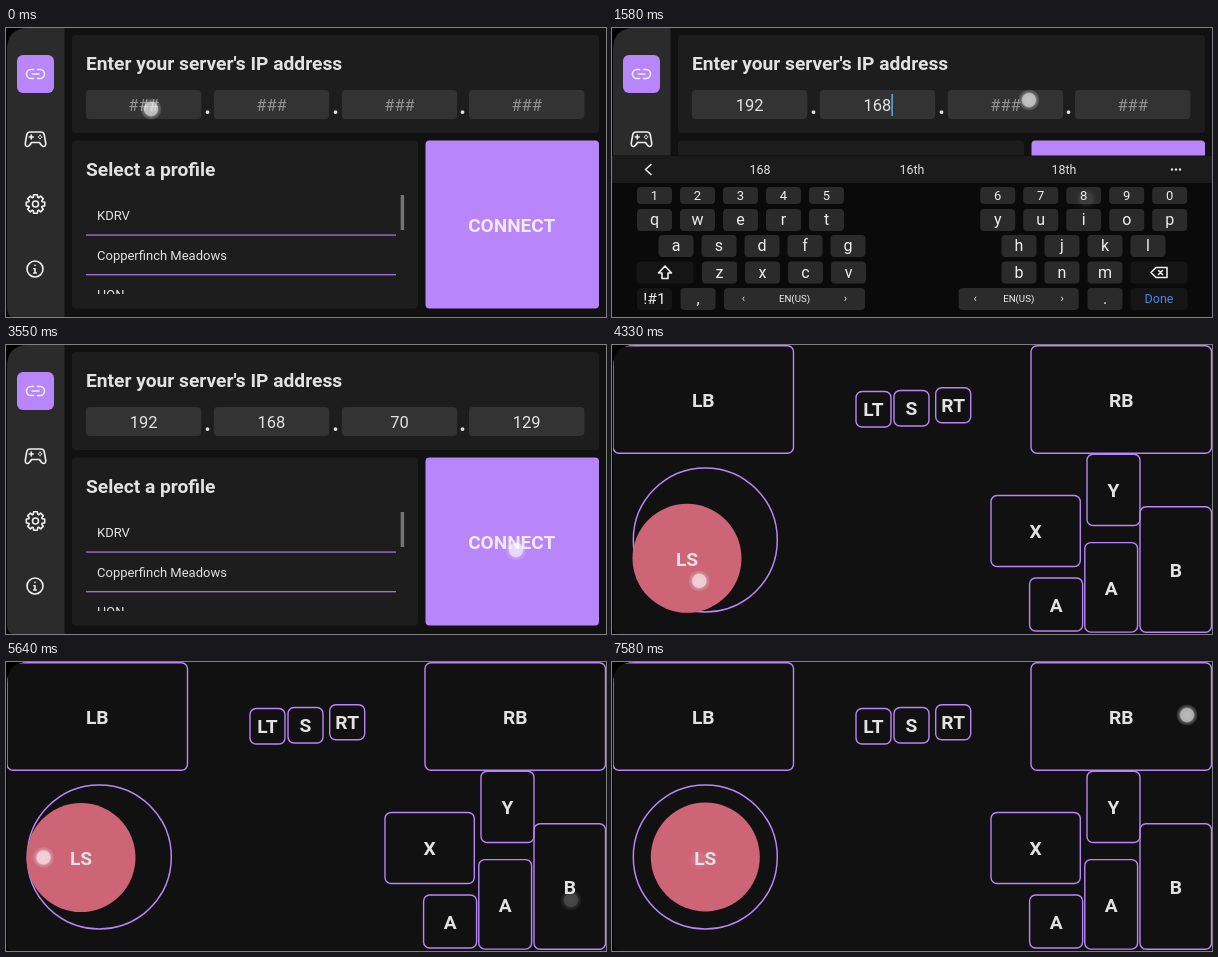
An HTML page that plays this animation: 600 by 289 pixels, repeating every 7.61 s.

```html
<!DOCTYPE html>
<html lang="en">
<head>
<meta charset="utf-8">
<title>Touch controller setup</title>
<style>
html, body { margin: 0; width: 100%; height: 100%; overflow: hidden; background: #000; }
svg { display: block; width: 100vw; height: 100vh; font-family: Roboto, sans-serif; }
text { fill: #e2e2e2; white-space: pre; }
.mid { text-anchor: middle; }
.bold { font-weight: 700; font-size: 19.2px; }
.line { fill: none; stroke: #eee; stroke-width: 1.6; stroke-linecap: round; stroke-linejoin: round; }
</style>
</head>
<body>
<svg id="stage" viewBox="0 0 600 289">
  <defs>
    <radialGradient id="glow">
      <stop offset="0" stop-color="#fff" stop-opacity=".72"/>
      <stop offset=".62" stop-color="#fff" stop-opacity=".66"/>
      <stop offset=".76" stop-color="#ddd" stop-opacity=".3"/>
      <stop offset="1" stop-color="#ccc" stop-opacity=".12"/>
    </radialGradient>
    <clipPath id="screen"><path d="M1 289V22Q1 0 23 0H600V289H8Q1 289 1 280Z"/></clipPath>
    <clipPath id="list"><rect x="80" y="165" width="312" height="101"/></clipPath>
  </defs>
  <g clip-path="url(#screen)">
    <rect width="600" height="289" fill="#111"/>
    <g id="setup"></g>
    <g id="pad"></g>
  </g>
  <g id="keyboard"></g>
  <g id="touches"></g>
</svg>
<script>
const LOOP = 7610, CONNECTED = 3690;
const PURPLE = '#b985fa';
const $ = id => document.getElementById(id);
const clamp = (v, a, b) => Math.min(b, Math.max(a, v));
const ease = p => p * p * (3 - 2 * p);
const phase = (t, a, b) => ease(clamp((t - a) / (b - a), 0, 1));

function add(parent, tag, attrs, content) {
  const el = document.createElementNS('http://www.w3.org/2000/svg', tag);
  for (const key in attrs) el.setAttribute(key, attrs[key]);
  if (content !== undefined) el.textContent = content;
  parent.appendChild(el);
  return el;
}
const box = (parent, x, y, w, h, fill, rx = 4) =>
  add(parent, 'rect', { x, y, width: w, height: h, fill, rx });
const label = (parent, x, y, content, size, cls = 'mid', fill = '#e2e2e2') =>
  add(parent, 'text', { x, y, class: cls, style: `font-size:${size}px;fill:${fill}` }, content);
const line = (parent, d, attrs) => add(parent, 'path', { d, class: 'line', ...attrs });

// Setup page
const setup = $('setup');
box(setup, 0, 0, 58.5, 289, '#2b2b2b', 0);
box(setup, 11, 27, 37, 38, PURPLE, 6);
const icon = y => add(setup, 'g', { transform: `translate(29.5 ${y})` });
line(icon(46), 'M-2-4.5H-4.5A4.5 4.5 0 0 0-4.5 4.5H-2M2-4.5H4.5A4.5 4.5 0 0 1 4.5 4.5H2M-3.5 0H3.5');

const gamepad = icon(111);
line(gamepad, 'M-5.5-7H5.5Q8-7 8.7-4.5L10.2 4Q10.5 7.5 8 7.5Q6.5 7.5 4 3.5H-4Q-6.5 7.5-8 7.5Q-10.5 7.5-10.2 4L-8.7-4.5Q-8-7-5.5-7Z');
line(gamepad, 'M-6.2-2H-2.2M-4.2-4V0M3-2H3.1M6-2H6.1M4.5-3.6H4.6M4.5-.4H4.6', { 'stroke-width': 1.3 });

const gear = icon(176);
let teeth = '';
for (let i = 0; i < 8; i++) {
  [[-.32, 7], [-.2, 9.4], [.2, 9.4], [.32, 7]].forEach(([turn, r]) => {
    const a = i * Math.PI / 4 + turn;
    teeth += `${teeth ? 'L' : 'M'}${(r * Math.sin(a)).toFixed(2)} ${(-r * Math.cos(a)).toFixed(2)}`;
  });
}
line(gear, teeth + 'Z');
add(gear, 'circle', { r: 3, class: 'line' });

const info = icon(241);
add(info, 'circle', { cx: -.5, r: 8, class: 'line' });
line(info, 'M-.5-.3V4M-.5-3.6V-3.5M-1.6-.3H-.5M-1.8 4H.8', { 'stroke-width': 1.5 });

box(setup, 66, 7, 527, 98, '#1d1d1d');
box(setup, 66, 112.5, 346, 168, '#1d1d1d');
box(setup, 419.5, 112.5, 173.5, 168, PURPLE);
label(setup, 80, 42, "Enter your server's IP address", 19.2, 'bold');
label(setup, 80, 147.5, 'Select a profile', 19.2, 'bold');
label(setup, 505.7, 204, 'CONNECT', 19, 'bold mid', '#f1eaf8');

const list = add(setup, 'g', { 'clip-path': 'url(#list)' });
['KDRV', 'Copperfinch Meadows', 'HQN'].forEach((name, i) => {
  label(list, 91, 192 + i * 39.5, name, 13, '');
  box(list, 80, 206.5 + i * 39.7, 310, 1.1, PURPLE, 0);
});
box(setup, 394.7, 167, 3.4, 35, '#737373', 0);

const FIELD_X = [137.6, 265.5, 393.5, 520.7];
const fields = FIELD_X.map((x, i) => {
  box(setup, x - 57.7, 62, 115.4, 29, '#333');
  if (i) label(setup, x - 64, 86, '.', 23, 'bold mid');
  return label(setup, x, 83, '###', 16.5);
});
const caret = box(setup, 0, 66, 1.4, 22, '#62b8dc', 0);

// Controller page
const pad = $('pad');
box(pad, 0, 0, 600, 289, '#111', 0);
[
  ['LB', 1, .7, 180.5, 107.5], ['RB', 419, .7, 180.5, 107.5],
  ['LT', 244, 46.5, 35, 35.5], ['S', 282, 45.5, 35, 35.5], ['RT', 323.7, 42.7, 35, 35],
  ['Y', 475, 109.3, 53, 71.2], ['X', 379, 150.5, 89.3, 71],
  ['B', 528, 161.7, 71.5, 125.5], ['A', 472.8, 197.6, 52.8, 89.5], ['A', 417.6, 233, 53, 53]
].forEach(([name, x, y, w, h]) => {
  box(pad, x, y, w, h, 'none', 6).setAttribute('stroke', PURPLE);
  pad.lastChild.setAttribute('stroke-width', 1.4);
  label(pad, x + w / 2, y + h / 2 + 7.2, name, 19.2, 'bold mid');
});
const HOME = [93.3, 195];
add(pad, 'circle', { cx: HOME[0], cy: HOME[1], r: 72, fill: 'none', stroke: PURPLE, 'stroke-width': 1.5 });
const stick = add(pad, 'g', {});
add(stick, 'circle', { r: 54.5, fill: '#cd6577' });
label(stick, 0, 7.7, 'LS', 19.2, 'bold mid');

// Keyboard
const keyboard = $('keyboard');
box(keyboard, 0, 127.5, 600, 162, '#0a0a0a', 0);
box(keyboard, 0, 128, 600, 27, '#1b1b1b', 0);
line(keyboard, 'M39 136.5L33.5 141.5L39 146.5', { 'stroke-width': 1.4 });
[560, 564, 568].forEach(cx => add(keyboard, 'circle', { cx, cy: 141.5, r: 1.2, fill: '#ddd' }));
const hints = [148, 300, 452].map(x => label(keyboard, x, 146, '', 12.4));

function key(cx, y, w, h, name, size = 16, fill = '#2b2b2b', ink = '#eee') {
  box(keyboard, cx - w / 2, y, w, h, fill);
  if (name) label(keyboard, cx, y + h / 2 + size * .34, name, size, 'mid', ink);
}
[
  ['12345', 42.5, 159, 17, 13], ['67890', 385.7, 159, 17, 13],
  ['qwert', 42.5, 181, 22, 16], ['yuiop', 385.7, 181, 22, 16],
  ['asdfg', 64, 207, 22, 16], ['hjkl', 407, 207, 22, 16],
  ['zxcv', 107.5, 233.5, 22, 16], ['bnm', 407, 233.5, 22, 16]
].forEach(([names, x, y, h, size]) =>
  [...names].forEach((name, i) => key(x + i * 43, y, 35, h, name, size)));
const DARK = '#151515';
key(53, 233.5, 57, 22, '', 16, DARK);
key(547, 233.5, 57, 22, '', 16, DARK);
line(keyboard, 'M53 238L59.5 245H56V250.5H50V245H46.5Z', { 'stroke-width': 1.3 });
line(keyboard, 'M544 239.5H555V249.5H544L539 244.5ZM546.5 242.5L550.5 246.5M550.5 242.5L546.5 246.5', { 'stroke-width': 1.3 });
key(42.5, 260, 35, 22, '!#1', 15.5, DARK);
key(86, 260, 35, 22, ',');
key(493, 260, 35, 22, '.');
key(547, 260, 57, 22, 'Done', 12.5, DARK, '#3d87f5');
[[182.5, 141, 51], [406.7, 120, 43.5]].forEach(([x, w, arrow]) => {
  key(x, 260, w, 22, 'EN(US)', 9.7);
  label(keyboard, x - arrow, 274, '‹', 11);
  label(keyboard, x + arrow, 274, '›', 11);
});

// Taps: down, up, x, y, action (a digit to type or a field to focus)
const TAPS = [
  [-60, 60, 145, 81, 'field0'], [390, 460, 43, 170, '1'], [540, 610, 518, 171, '9'], [700, 770, 88, 170, '2'],
  [880, 960, 286, 75, 'field1'], [1070, 1140, 43, 170, '1'], [1220, 1290, 388, 170, '6'], [1380, 1450, 474, 171, '8'],
  [1530, 1630, 417, 72, 'field2'], [1750, 1820, 431, 171, '7'], [1900, 1970, 560, 171, '0'],
  [2090, 2170, 545, 76, 'field3'], [2270, 2340, 43, 170, '1'], [2430, 2500, 88, 170, '2'], [2590, 2670, 521, 172, '9'],
  [2850, 2920, 548, 270, 'done'], [3460, 3560, 510, 205],
  [4520, 4620, 563, 235], [4840, 4930, 497, 241], [5160, 5250, 425, 190], [5440, 5540, 565, 238],
  [5880, 5970, 498, 242], [6140, 6230, 425, 188], [6410, 6510, 497, 240],
  [6790, 6900, 572, 40], [7080, 7170, 497, 242], [7440, 7700, 575, 53]
];
const HINTS = [
  [460, '1', '192.168.70.171', '1st'], [770, '192', '192.168.70.171', '1920'], [960, '', '', ''],
  [1140, '1', '192.168.70.171', '1st'], [1450, '168', '16th', '18th'], [1630, '', '', ''],
  [1820, '7', '70', '7th'], [1970, '70', '70s', '70th'], [2170, '', '', ''], [2340, '1', '192.168.70.171', '1st']
];
// Thumb drags on the stick: time, x, y
const DRAGS = [
  [[3960, 93, 195], [4060, 50, 200], [4200, 46, 218], [4270, 60, 226], [4330, 87, 236], [4480, 125, 220],
   [4650, 138, 195], [4850, 60, 188], [4980, 27, 196], [5640, 37.5, 195.5], [5840, 40, 196]],
  [[6440, 93, 199], [6520, 87, 198], [6580, 68, 192], [6700, 42, 194], [7300, 40, 203], [7450, 46, 203]]
];

function along(points, t) {
  const i = clamp(points.findIndex(p => p[0] > t), 1, points.length - 1);
  const [a, b] = [points[i - 1], points[i]];
  const p = clamp((t - a[0]) / (b[0] - a[0]), 0, 1);
  return [a[1] + (b[1] - a[1]) * p, a[2] + (b[2] - a[2]) * p];
}
const span = drag => [drag[0][0], drag[drag.length - 1][0]];

function stickAt(t) {
  const drag = DRAGS.find(d => t >= d[0][0] && t < span(d)[1] + 130);
  if (!drag) return HOME;
  const [start, end] = span(drag);
  const back = 1 - phase(t, end + 10, end + 110);
  const pos = along(drag, clamp(t - 60, start, end));
  return pos.map((v, i) => HOME[i] + clamp(v - HOME[i], -18.3, 18.3) * back);
}

const dots = [...TAPS, ...DRAGS].map(() => add($('touches'), 'circle', { r: 10.5, fill: 'url(#glow)' }));
function showDot(dot, t, down, up, x, y) {
  const alpha = clamp((t - down) / 45, 0, 1) * clamp(1 - (t - up) / 150, 0, 1);
  dot.setAttribute('opacity', alpha);
  dot.setAttribute('cx', x);
  dot.setAttribute('cy', y);
}

function render(t) {
  const values = ['', '', '', ''];
  let focus = -1;
  for (const [, up, , , action] of TAPS) {
    if (!action || up > t) continue;
    if (action === 'done') focus = -1;
    else if (action.startsWith('field')) focus = +action.slice(5);
    else values[focus] += action;
  }
  fields.forEach((field, i) => {
    field.textContent = values[i] || '###';
    field.style.fill = values[i] ? '#e2e2e2' : '#929292';
  });
  caret.setAttribute('visibility', focus < 0 ? 'hidden' : 'inherit');
  if (focus >= 0) caret.setAttribute('x', FIELD_X[focus] + values[focus].length * 4.64);

  const raised = phase(t, 120, 300) * (1 - phase(t, 2920, 3050));
  keyboard.setAttribute('visibility', raised ? 'visible' : 'hidden');
  keyboard.setAttribute('transform', `translate(0 ${162 * (1 - raised)})`);
  const words = HINTS.filter(h => h[0] <= t).pop() || [0, '', '', ''];
  hints.forEach((hint, i) => hint.textContent = words[i + 1]);

  const playing = t >= CONNECTED;
  setup.setAttribute('visibility', playing ? 'hidden' : 'visible');
  pad.setAttribute('visibility', playing ? 'visible' : 'hidden');
  stick.setAttribute('transform', `translate(${stickAt(t).join(' ')})`);

  TAPS.forEach(([down, up, x, y], i) => showDot(dots[i], t, down, up, x, y));
  DRAGS.forEach((drag, i) => showDot(dots[TAPS.length + i], t, ...span(drag), ...along(drag, t)));
}

const begin = performance.now();
function tick() {
  render((performance.now() - begin) % LOOP);
  requestAnimationFrame(tick);
}
tick();
</script>
</body>
</html>
```
